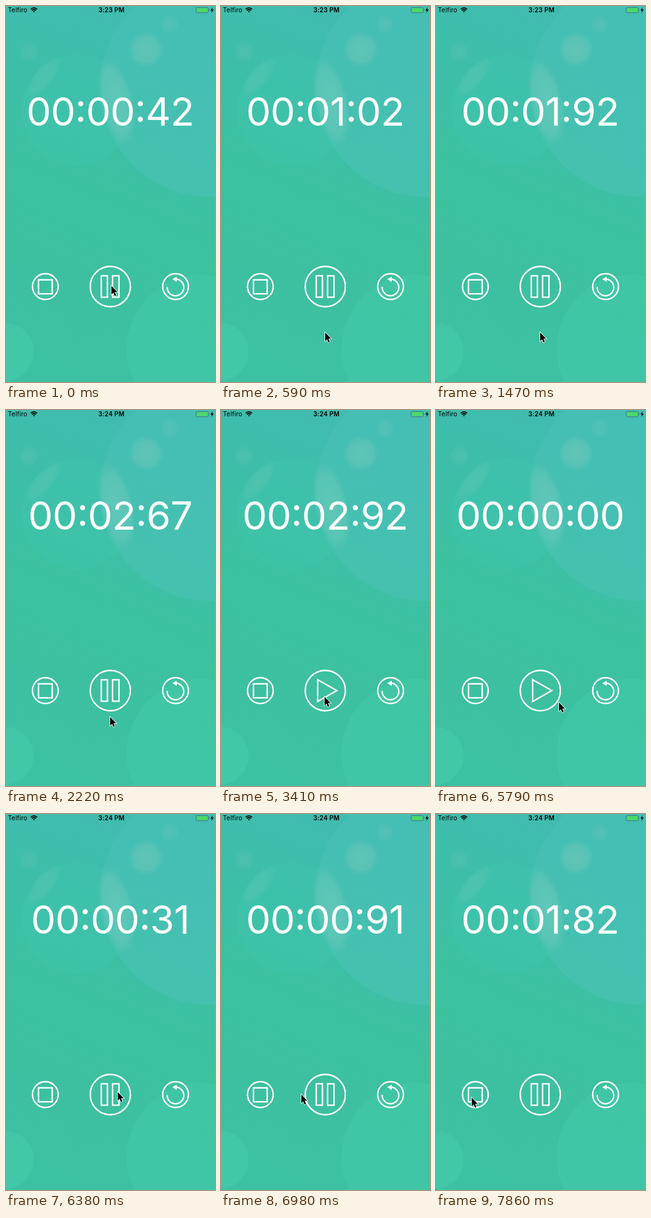
An HTML page that plays this animation: 333 by 597 pixels, repeating every 8000 ms.

```html
<!DOCTYPE html>
<html lang="en">
<head>
<meta charset="utf-8">
<title>Stopwatch</title>
<style>
  html, body { margin: 0; width: 100%; height: 100%; overflow: hidden; background: #3dc1a2; }
  svg { display: block; width: 100%; height: 100%; }
  text { font-family: Inter, Roboto, sans-serif; }
  #timer { font-size: 62.5px; letter-spacing: -.65px; fill: #fff; font-feature-settings: "calt" 0; }
  .status { font-size: 10px; letter-spacing: .2px; }
  .icons { fill: none; stroke: #fff; stroke-width: 2.3; }
</style>
</head>
<body>
<svg viewBox="0 0 333 597">
  <defs>
    <linearGradient id="sky" x1=".62" y1="0" x2=".38" y2="1">
      <stop offset="0" stop-color="#40bcb0"/>
      <stop offset=".3" stop-color="#3dbea9"/>
      <stop offset=".57" stop-color="#3cc29d"/>
      <stop offset=".75" stop-color="#3dc0a0"/>
      <stop offset="1" stop-color="#3dc1a3"/>
    </linearGradient>
    <radialGradient id="glow">
      <stop offset="0" stop-color="#8acdc0" stop-opacity=".4"/>
      <stop offset=".7" stop-color="#8acdc0" stop-opacity=".28"/>
      <stop offset="1" stop-color="#8acdc0" stop-opacity="0"/>
    </radialGradient>
    <linearGradient id="disc" x1="0" y1="0" x2="0" y2="1">
      <stop offset="0" stop-color="#56c6c0" stop-opacity=".2"/>
      <stop offset="1" stop-color="#50c4bf" stop-opacity=".42"/>
    </linearGradient>
  </defs>

  <rect width="333" height="597" fill="url(#sky)"/>
  <circle cx="113" cy="165" r="88" fill="#41c5b0" opacity=".3"/>
  <circle cx="325" cy="128" r="175" fill="url(#disc)"/>
  <circle cx="310" cy="545" r="118" fill="#48d0b0" opacity=".3"/>
  <circle cx="-2" cy="549" r="46" fill="#4cd3ae" opacity=".3"/>
  <g fill="url(#glow)">
    <ellipse cx="176" cy="153" rx="27" ry="72" transform="rotate(-12 176 153)"/>
    <ellipse cx="60" cy="113" rx="15" ry="41" transform="rotate(40 60 113)" opacity=".5"/>
    <circle cx="37" cy="73" r="16" opacity=".45"/>
    <circle cx="223" cy="69" r="28"/>
    <circle cx="261" cy="29" r="15" opacity=".5"/>
  </g>

  <text class="status" x="3" y="10">Telfiro</text>
  <g fill="none" stroke="#000" stroke-width="1.7">
    <path d="M39.4 5.1Q44.5 .5 49.6 5.1M41.2 7.2Q44.5 4.3 47.8 7.2"/>
    <path d="M44.5 10.3L42.8 8.6Q44.5 7.3 46.2 8.6Z" fill="#000" stroke="none"/>
  </g>
  <text class="status" id="clock" x="168" y="10" text-anchor="middle" font-weight="600"></text>
  <rect x="302.8" y="2.4" width="19.6" height="8.4" rx="2.2" fill="none" stroke="#3c6d68" stroke-width=".8"/>
  <rect x="304" y="3.6" width="17.2" height="6" rx="1.1" fill="#4cd964"/>
  <path d="M323.3 5.2q1.3 1.4 0 2.8z" fill="#3c6d68"/>
  <path d="M329.4 2L325.6 7.1H328L327 11L331 5.7H328.5Z"/>

  <text id="timer" x="166" y="189.7" text-anchor="middle"></text>

  <g class="icons">
    <circle cx="62.7" cy="445.5" r="20.5"/>
    <rect x="51.8" y="434.8" width="21.8" height="22.2"/>
    <circle cx="166.2" cy="445.5" r="32"/>
    <path id="pause" d="M151.8 428.3h9.8v34h-9.8zM169.8 428.3h10.2v34h-10.2z"/>
    <path id="play" d="M154 428.2L184.6 445.4L154 462.8Z"/>
    <circle cx="270.2" cy="445.5" r="20.5"/>
    <path d="M270.5 433.7A13.2 13.2 0 1 1 256.9 445.8"/>
    <path d="M264.8 433.8L272 429.8V438Z" fill="#fff" stroke="none"/>
  </g>

  <path id="cursor" d="M0 .5V14L3 11.2L5.2 16.2L7.4 15.2L5.3 10.3H9.5Z" stroke="#fff" stroke-width="1.6" paint-order="stroke"/>
</svg>
<script>
  // The screen refreshes in fixed ticks; every event below is counted in them.
  const LOOP = 8000, TICK = 148.3, LEAD = 14;
  const CLOCK_CHANGE = 13, PAUSED = 17, RESET = 34, RESTARTED = 41;

  const START = { x: 168, y: 444 };
  const MOVES = [
    { from: 0, to: 4, x: 166, y: 518 },
    { from: 13, to: 17, x: 165, y: 455 },
    { from: 29, to: 33, x: 270, y: 441 },
    { from: 34, to: 41, x: 178, y: 441, sag: 40 },
    { from: 43, to: 52, x: 57, y: 450 }
  ];

  const el = id => document.getElementById(id);
  const [clock, timer, pause, play, cursor] =
    ["clock", "timer", "pause", "play", "cursor"].map(el);

  const smooth = k => k * k * (3 - 2 * k);

  function pointerAt(tick) {
    let { x, y } = START;
    for (const move of MOVES) {
      const k = smooth(Math.min(1, Math.max(0, (tick - move.from) / (move.to - move.from))));
      x += (move.x - x) * k;
      y += (move.y - y) * k + (move.sag || 0) * Math.sin(Math.PI * k);
    }
    return [Math.round(x), Math.round(y)];
  }

  function hundredthsAt(tick) {
    if (tick < PAUSED) return 42 + 15 * tick;
    if (tick < RESET) return 292;
    if (tick < RESTARTED) return 0;
    return Math.floor(1 + 15.1 * (tick - RESTARTED));
  }

  function showTime(value) {
    const pad = n => String(n).padStart(2, "0");
    const colon = '<tspan dy="-5.5">:</tspan>';
    const lowered = n => `<tspan dy="5.5">${pad(n)}</tspan>`;
    timer.innerHTML = "00" + colon + lowered(Math.floor(value / 100)) + colon + lowered(value % 100);
  }

  let shown = -1;
  function draw() {
    const tick = Math.floor((performance.now() % LOOP + LEAD) / TICK);
    if (tick !== shown) {
      shown = tick;
      const stopped = tick >= PAUSED && tick < RESTARTED;
      showTime(hundredthsAt(tick));
      clock.textContent = tick < CLOCK_CHANGE ? "3:23 PM" : "3:24 PM";
      play.style.display = stopped ? "" : "none";
      pause.style.display = stopped ? "none" : "";
      cursor.setAttribute("transform", `translate(${pointerAt(tick)})`);
    }
    requestAnimationFrame(draw);
  }
  draw();
</script>
</body>
</html>
```
